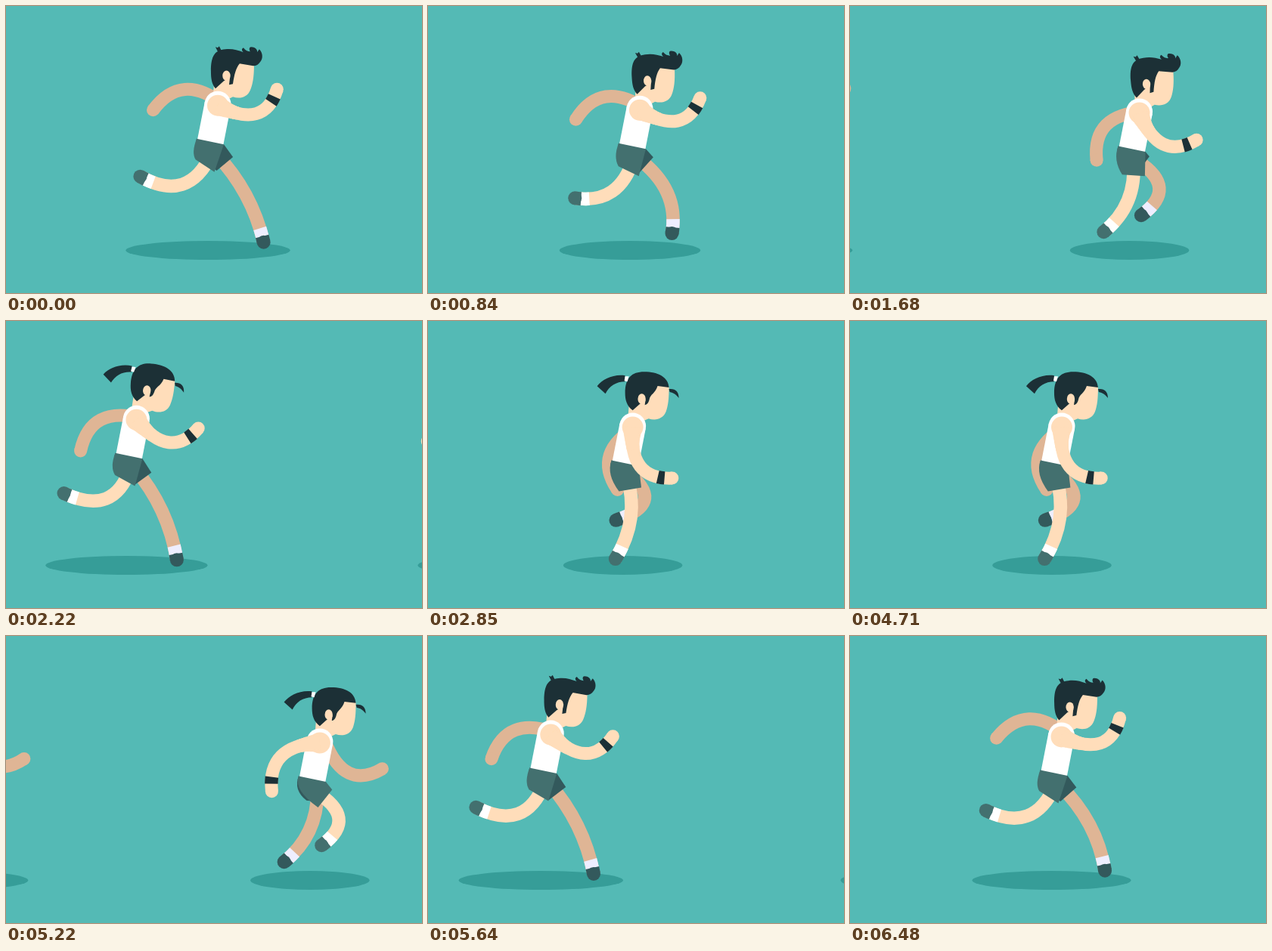
An HTML page with a canvas for the animation above (6.51 s loop, 550 by 380 pixels).

```html
<!DOCTYPE html>
<html lang="en">
<head>
<meta charset="utf-8">
<title>Runners</title>
<style>
  html, body { margin: 0; width: 100%; height: 100%; overflow: hidden; background: #54bab5; }
  canvas { display: block; }
</style>
</head>
<body>
<canvas id="stage" width="550" height="380"></canvas>
<script>
const ctx = document.getElementById('stage').getContext('2d');
const LOOP = 6510, STRIDE = 930, STEP = 30, GAP = 475, TURN = 2 * Math.PI;
const C = {
  bg: '#54bab5', shadow: '#369d98', skin: '#ffddba', skinFar: '#dfb595',
  hair: '#1c3036', shorts: '#43706f', shortsFar: '#33595c',
  white: '#ffffff', sockFar: '#eeeeff'
};

// Key leg poses: foot x y, bend x y
const LEG = {
  back: [177, 225, 241, 262],
  swing: [262, 266, 325, 242],
  front: [341, 313, 325, 246],
  stance: [253, 313, 288, 262]
};

const MAN = {
  phase: 0, base: 1, ear: [291.5, 92],
  face: new Path2D('M276 90L308 72L328 78C328 94 326 104 323 111C319 121 309 123 300 120L292 124L274 116Z'),
  hair: new Path2D('M271 86C271 66 276 58 290 57C299 56 306 58 314 61C311 58 312 56 314 55C317 59 320 60 323 60C321 57 322 54 324 54C331 54 333 59 332 61L335 57C340 62 340 70 336 74C334 77 331 79 327 79L309 76C304 82 302 90 300 103L295 104L296 95L288 99L277 109C272 103 271 96 271 86ZM280 60L277 54L280 55L282 53L285 59Z')
};
const WOMAN = {
  phase: 645, base: 10, ear: [292, 103],
  face: new Path2D('M276 100L308 80L328 87C328 102 327 112 324 120C320 130 310 132 301 129L292 133L274 125Z'),
  hair: new Path2D('M270 95C270 75 279 67 295 67C314 67 327 74 328 88L313 86C310 96 303 97 302 104C301 108 299 111 296 111L297 104L289 110L280 118C272 112 270 104 270 95ZM328 90C336 89 341 93 341 102C337 97 334 95 329 94ZM270 72C254 70 240 77 233 86L244 96C249 86 258 80 270 80Z'),
  tie: new Path2D('M270 73L275 73L273 80L269 79Z')
};

// Ease with handles (.2, 0) and (.2, 1)
function ease(x) {
  if (x <= 0) return 0;
  if (x >= 1) return 1;
  let lo = 0, hi = 1;
  for (let i = 0; i < 24; i++) {
    const t = (lo + hi) / 2;
    if (0.6 * t * (1 - t) + t * t * t < x) lo = t; else hi = t;
  }
  return lo * lo * (3 - 2 * lo);
}

function fill(path, color) {
  ctx.fillStyle = color;
  ctx.fill(path);
}

function oval(x, y, rx, ry, color) {
  const p = new Path2D();
  p.ellipse(x, y, rx, ry, 0, 0, TURN);
  fill(p, color);
}

const disc = (x, y, r, color) => oval(x, y, r, r, color);

// Stroke part of a bent limb, measured from its first point
function strip(from, bend, to, color, width, start = 0, length = 999) {
  ctx.beginPath();
  ctx.moveTo(...from);
  ctx.quadraticCurveTo(...bend, ...to);
  ctx.strokeStyle = color;
  ctx.lineWidth = width;
  ctx.setLineDash([length, 999]);
  ctx.lineDashOffset = -start;
  ctx.stroke();
  ctx.setLineDash([]);
}

// Swing eases back to front, then front to back, each by way of a middle pose
function leg(hip, time, skin, sock, shoe) {
  const a = TURN * (time - 15) / STRIDE, cos = Math.cos(a), sin = Math.sin(a);
  const via = sin > 0 ? LEG.swing : LEG.stance;
  const [x, y, bx, by] = LEG.back.map((b, i) => {
    const f = LEG.front[i], mid = (b + f) / 2;
    return mid + (b - f) / 2 * cos + (via[i] - mid) * sin * sin;
  });
  const foot = [x, y], bend = [bx, by];
  strip(foot, bend, hip, skin, 17.5);
  strip(foot, bend, hip, sock, 17.5, 7, 12);
  strip(foot, bend, hip, shoe, 18, 0, 8);
  disc(x, y, 9, shoe);
  return { foot, bend };
}

// Ends of the trouser hem, across the thigh at a distance from the hip
function hem(hip, { foot, bend }, distance, half) {
  const t = distance / 2 / Math.hypot(bend[0] - hip[0], bend[1] - hip[1]);
  const mix = (a, b) => a.map((v, i) => v + (b[i] - v) * t);
  const p = mix(hip, bend), q = mix(bend, foot), [x, y] = mix(p, q);
  const dx = q[0] - p[0], dy = q[1] - p[1], k = half / Math.hypot(dx, dy);
  return [[x - dy * k, y + dx * k], [x + dy * k, y - dx * k]];
}

// The hand swings round the shoulder and the bend trails at a fixed angle
function arm(shoulder, time, skin) {
  const cos = Math.cos(TURN * (time + 35) / STRIDE);
  const angle = (80 - 98 * cos) * TURN / 360;
  const at = (a, r) => [shoulder[0] + r * Math.cos(a), shoulder[1] + r * Math.sin(a)];
  const hand = at(angle, 87 - 6 * cos), bend = at(angle + 0.75, 70);
  strip(hand, bend, shoulder, skin, 17);
  disc(...hand, 8.5, skin);
  return { hand, bend };
}

function shorts(back, front, dy, color) {
  const p = new Path2D();
  p.moveTo(252, 175.5 + dy);
  p.lineTo(288, 183 + dy);
  p.lineTo(...front);
  p.lineTo(...back);
  p.quadraticCurveTo(245, 194 + dy, 252, 175.5 + dy);
  fill(p, color);
}

function head(who, bob) {
  const py = 117 + who.base, rise = bob - who.base;
  ctx.save();
  ctx.translate(290, py + rise * 1.15);
  ctx.rotate(-0.0078 * rise);
  ctx.translate(-290, -py);
  fill(who.face, C.skin);
  fill(who.hair, C.hair);
  if (who.tie) fill(who.tie, C.white);
  oval(...who.ear, 5.2, 6.8, C.skin);
  ctx.restore();
}

function runner(who, time, x) {
  if (Math.abs(x) > 470) return;
  const half = STRIDE / 2, t = time + who.phase;
  const wave = lag => Math.cos(TURN * (t - lag) / half);
  const bob = 5.5 * (1 - wave(50)), dy = bob - 1;
  ctx.save();
  ctx.translate(x, 0);
  oval(267, 323.5, 94 + 16 * wave(30), 12.5, C.shadow);

  arm([287, 130 + dy], t + half, C.skinFar);
  const hipFar = [277, 195 + dy];
  const far = leg(hipFar, t + half, C.skinFar, C.sockFar, C.shortsFar);
  const reach = Math.hypot(far.foot[0] - hipFar[0], far.foot[1] - hipFar[1]);
  shorts(...hem(hipFar, far, reach * 0.14, 14), dy, C.shortsFar);

  const hip = [272, 195 + dy];
  const near = leg(hip, t, C.skin, C.white, C.shorts);
  head(who, bob);

  ctx.strokeStyle = C.white;
  ctx.lineWidth = 35;
  ctx.beginPath();
  ctx.moveTo(280, 130 + dy);
  ctx.lineTo(270, 181 + dy);
  ctx.stroke();
  disc(280, 130 + dy, 17.5, C.white);
  shorts(...hem(hip, near, 20, 15), dy, C.shorts);

  const shoulder = [280, 131.5 + dy];
  const { hand, bend } = arm(shoulder, t, C.skin);
  disc(...shoulder, 14, C.skin);
  for (let d = 2; d <= 30; d += 2) {
    strip(shoulder, bend, hand, C.skin, 17 + 10 * (1 - d / 30) ** 1.5, 0, d);
  }
  strip(hand, bend, shoulder, C.hair, 17.5, 10, 9);
  ctx.restore();
}

function draw() {
  const t = Math.floor(performance.now() % LOOP / STEP) * STEP;
  ctx.fillStyle = C.bg;
  ctx.fillRect(0, 0, 550, 380);
  const first = GAP * ease((t - 1410) / 1765), second = GAP * ease((t - 4928) / 1620);
  runner(WOMAN, t, first - GAP + second);
  runner(MAN, t, t < LOOP / 2 ? first : second - GAP);
  requestAnimationFrame(draw);
}
draw();
</script>
</body>
</html>
```
